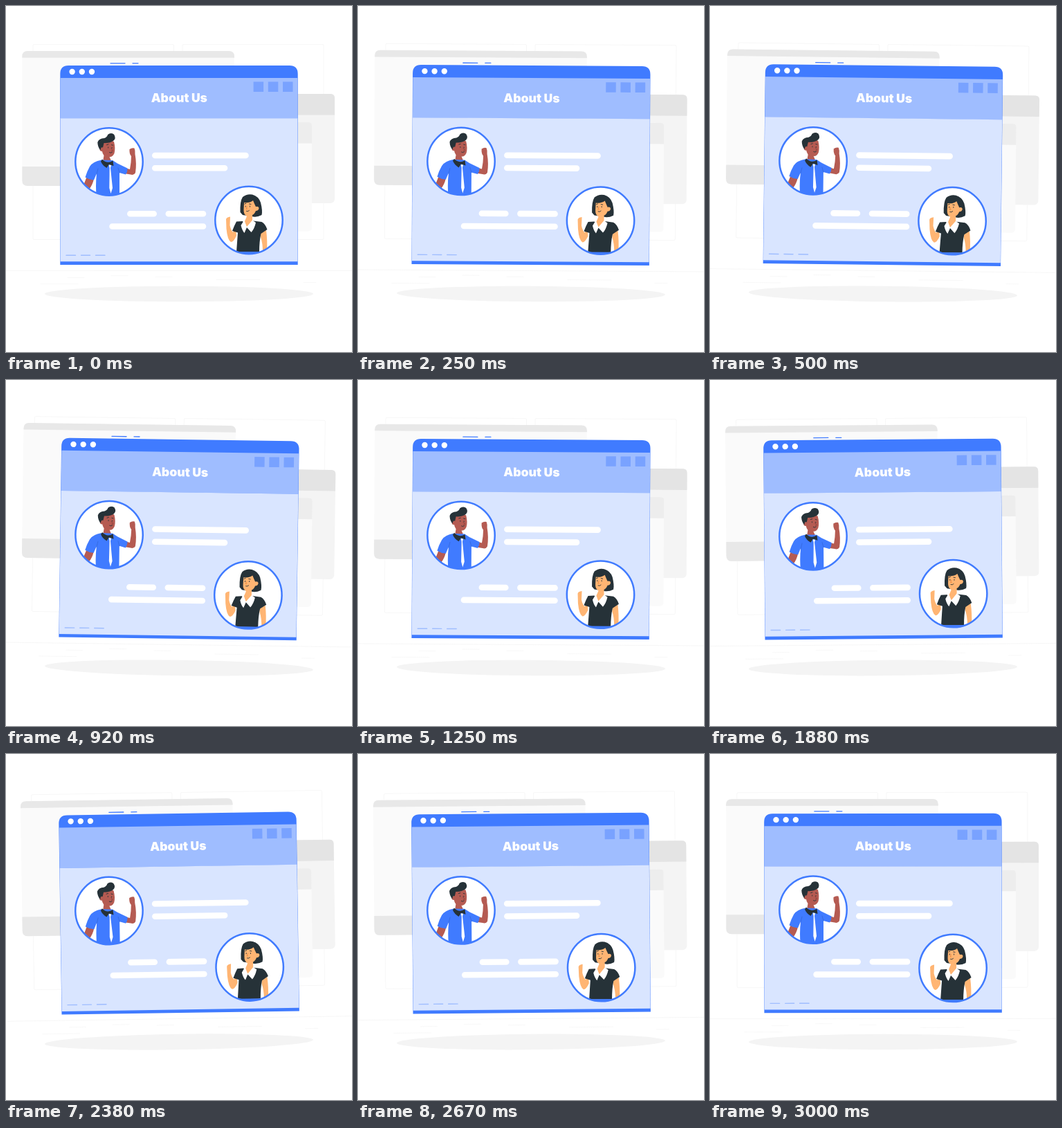
Write an HTML page that moves like this. It is 500 by 500 pixels and loops after 3040 ms.

```html
<!DOCTYPE html>
<html lang="en">
<head>
<meta charset="utf-8">
<title>About Us</title>
<style>
  html, body { margin: 0; height: 100%; overflow: hidden; background: #fff; }
  svg { display: block; width: 100%; height: 100%; }
  text { font: 900 17.6px Inter, "Open Sans", sans-serif; text-anchor: middle; }
  .blue { fill: #407bff; }
  .dark { fill: #263238; }
  .white { fill: #fff; }
  .line { fill: none; stroke-linecap: round; }
</style>
</head>
<body>
<svg viewBox="0 0 500 500">
  <defs>
    <clipPath id="manClip"><circle cx="149" cy="225" r="49"/></clipPath>
    <clipPath id="womanClip"><circle cx="351" cy="309.5" r="49"/></clipPath>
  </defs>

  <g data-pivot="250 228">
    <g class="line" stroke="#f7f7f7">
      <rect x="39" y="55.5" width="203.500" height="282" rx="2"/>
      <rect x="255" y="55.500" width="204" height="282" rx="2"/>
      <path stroke="#f3f3f3" stroke-width=".7" d="M0 382.500H500"/>
      <path stroke-width=".8" d="M89 392.500h24M152 389.700h24M216 391.500h24M304 395.300h63M50 401.700h54M430 399.500h18"/>
    </g>
    <rect x="23.300" y="65" width="306.500" height="195" rx="8" fill="#fafafa"/>
    <path fill="#e8e8e8" d="M23.300 74.700V73q0-8 8-8H322q8 0 8 8v1.700zM23.300 232H330v20q0 8-8 8H31.300q-8 0-8-8z"/>
    <path class="line" stroke="#407bff" stroke-width="1.300" d="M151 82.800h21M183 82.800h8"/>
    <rect x="300" y="127" width="175" height="158" rx="6" fill="#f4f4f4"/>
    <path fill="#e4e4e4" d="M300 127H469q6 0 6 6v24.500H300z"/>
    <rect x="300" y="168" width="142" height="157.500" rx="5" fill="#fafafa"/>
    <path fill="#ededed" d="M300 168H437q5 0 5 5v25.500H300z"/>
  </g>

  <g data-pivot="250 416"><ellipse cx="250" cy="416" rx="194" ry="11.300" fill="#f4f4f4"/></g>

  <g data-pivot="250 230">
    <path class="blue" d="M78.300 374V98q0-12 12-12H409.700q12 0 12 12V374z"/>
    <path fill="#9fbdff" d="M78.600 104H421.400v58.500H78.600z"/>
    <path fill="#d9e5ff" d="M78.600 162.300H421.400V369.300H78.600z"/>
    <g class="white">
      <circle cx="95.600" cy="95" r="4.200"/>
      <circle cx="109.800" cy="95" r="4.200"/>
      <circle cx="124" cy="95" r="4.200"/>
    </g>
    <path fill="#79a2ff" d="M357.600 109.600h14.500v14.500h-14.500zM378.800 109.600h14.500v14.500h-14.500zM400 109.600h14.500v14.500h-14.500z"/>
    <text class="white" x="250.300" y="139.300">About Us</text>
    <path class="line" stroke="#fff" stroke-width="8.600" d="M215.300 216H346.500M215.300 234.200H316M179.300 300.200H213.700M234.800 300.200H285M153.500 318.500H285"/>
    <path class="line" stroke="#9fbdff" stroke-width="1.400" d="M87 360.200h13.500M108.500 360.200h13M129.500 360.200h13.500"/>

    <circle class="white" cx="149" cy="225" r="49"/>
    <g clip-path="url(#manClip)">
      <g fill="#b55b52">
        <path d="M117 246L127 250Q125 259 120 265L122 275H112V259z"/>
        <path d="M172 234L179 236Q181 226 181 217Q178 214 178.500 207Q182 204.500 185.500 205.500Q187 209 186.500 214Q189 228 187 241Q185 245 180 243.500L171 242z"/>
        <path d="M139 198Q148 191 156 196Q158.500 206 156.500 213Q154 218.500 149.500 218L153 226Q148 231 140 225L141.500 216Q137 210 139 198z"/>
        <circle cx="138.500" cy="207" r="3"/>
      </g>
      <path class="blue" d="M138 222.500Q125 225 121 232Q117 239 114.500 247.500Q120 251 127 251.500L131 242Q129 260 131 278H164V241L173 243.500Q176 239 175.500 234.500L161 227.500L154 223z"/>
      <path class="line" stroke="#2f62cf" stroke-width=".6" d="M131 243l2-8M164 241l-2-7"/>
      <path class="dark" d="M139 221.500Q146 229 154.500 223.500L155.500 231L149 229L145.500 234Q139 230 137 224.500z"/>
      <path class="white" d="M148.500 229.500L152 230L151 234L154 263L151.500 271L149.300 263L149.700 234z"/>
      <path class="dark" d="M136.500 208.500Q132.500 204 132.300 197Q134 191.500 142 191Q146 189.500 147 186Q151 182.500 156 185.500Q159.500 191 155.500 194.500Q150 198.500 141.500 198L140 204.500Q137 203 136.500 208.500z"/>
      <g class="line" stroke="#263238" stroke-width=".9">
        <path d="M145.500 200.700l2.500-.8M152.500 200.700l2 .5M147.700 204v1M153 204.500v1M149.500 211.700q2 1.500 4-.5"/>
        <path stroke="#8c3e39" d="M152 206l2.500 3-2 .6"/>
      </g>
    </g>
    <circle class="line" cx="149" cy="225" r="48.700" stroke="#407bff" stroke-width="2.500"/>

    <circle class="white" cx="351" cy="309.500" r="49"/>
    <g clip-path="url(#womanClip)">
      <path class="dark" d="M338.500 298Q338 282 342 276Q348 271 356 272.500Q365 275 368 284Q371 296 369.500 302Q362 306 355 304L342 302z"/>
      <g fill="#ffb573">
        <path d="M318 308Q319 305 324 304.500L323.500 317Q325 324 328 327L332 320L333 332Q329 341 325 341Q320 338 318.500 322z"/>
        <path d="M368 328L376 324Q378 340 377 354L371 356Q371 342 368 334z"/>
        <path d="M344 284Q352 285 357 281Q359 286 361 290Q365 289 365.500 292Q365 296 361 296Q359 301 356 302V312L348 320L345 311L348 304Q343 301 343.500 294z"/>
      </g>
      <path class="dark" d="M342 311L333 311.500Q330 317 327 325L335 327.500L333 355.500H366Q366 340 368.500 329L377.500 323Q375 315 369.500 312L357 310.500L348 320z"/>
      <path class="blue" d="M330 355H370V362H330z"/>
      <path class="white" d="M343.500 310.500L339.500 317Q341 324 344.500 328L348 320L354.500 327Q359 322 361 313L356 309.500L348 319z"/>
      <g class="line" stroke="#263238" stroke-width=".9">
        <path d="M344.800 286l2-.6M351.500 286l2.500.5M346.300 289v1.200M352.500 289v1.200M347.500 296.500q2.500 1 4-1"/>
        <path stroke="#ed893e" d="M348.500 290l-1.500 3.300h1.800"/>
      </g>
    </g>
    <circle class="line" cx="351" cy="309.500" r="48.700" stroke="#407bff" stroke-width="2.500"/>
  </g>
</svg>
<script>
  const LOOP = 3040;
  const groups = document.querySelectorAll("[data-pivot]");

  // Triangle wave: 0, 1, 0, -1, 0 degrees at each quarter of the loop.
  function swayAt(phase) {
    return 1 - 4 * Math.abs((phase + 0.25) % 1 - 0.5);
  }

  const start = performance.now();
  function draw(now) {
    const angle = swayAt(Math.max(0, now - start) % LOOP / LOOP);
    for (const group of groups) {
      group.setAttribute("transform", `rotate(${angle} ${group.dataset.pivot})`);
    }
    requestAnimationFrame(draw);
  }
  draw(start);
</script>
</body>
</html>
```
